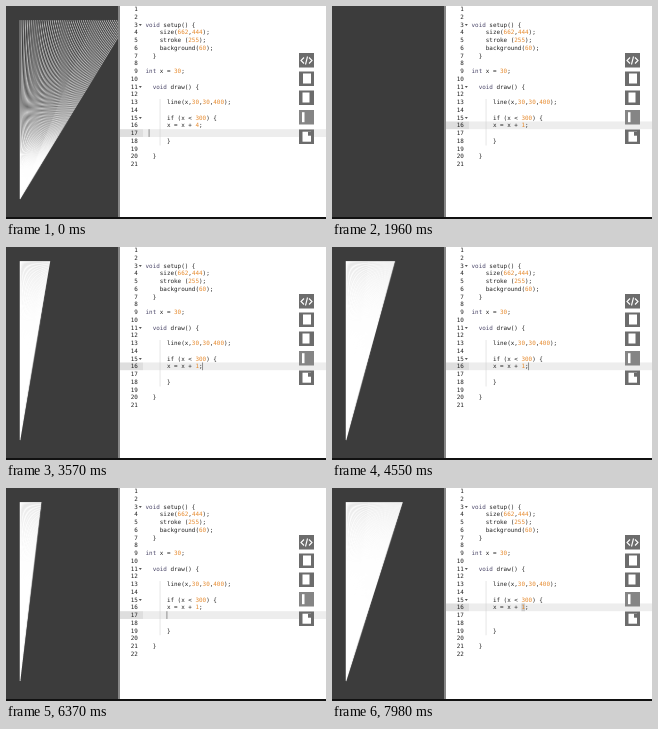
Write an HTML page with a canvas that moves like this. It is 320 px wide and 213 px high and loops after 8000 ms.

```html
<!DOCTYPE html>
<html>
<head>
<meta charset="utf-8">
<style>
html, body { margin: 0; width: 100%; height: 100%; overflow: hidden; background: #fff; }
canvas, svg { position: absolute; left: 0; top: 0; }
text { font: 5.93px "DejaVu Sans Mono", monospace; white-space: pre; fill: #222; }
.num { fill: #e68a2e; }
.type { fill: #4a4668; }
.no { text-anchor: end; }
</style>
</head>
<body>
<canvas id="view" width="320" height="213"></canvas>
<svg width="320" height="213" viewBox="0 0 320 213">
  <rect x="114" width="206" height="213" fill="#fff"/>
  <rect x="112" width="2" height="213" fill="#868686"/>
  <g id="editor"></g>
  <g id="icons"></g>
  <rect y="211" width="320" height="2" fill="#111"/>
</svg>
<script>
const LOOP = 8000, PITCH = 7.75, CHAR = 3.57, LEFT = 139.5, GUTTER = 137;
const WIDTH = 662, HEIGHT = 444, DENSITY = 2;
const $ = id => document.getElementById(id);
const view = $('view').getContext('2d');
const sketch = document.createElement('canvas');
sketch.width = WIDTH * DENSITY;
sketch.height = HEIGHT * DENSITY;
const pen = sketch.getContext('2d');
pen.scale(DENSITY, DENSITY);

// Each run of the sketch: start time, x increment and [time, x] points
const runs = [
  { at: 0, step: 4, keys: [[0, 256], [400, 302]] },
  { at: 1960, step: 1, keys: [[2170, 30], [2590, 50], [3640, 96], [3780, 98], [4550, 131]] },
  { at: 4900, step: 1, keys: [[5090, 30], [5670, 58], [6160, 72], [6300, 72], [6930, 97], [7980, 147]] }
];

// Editor states: caret line and column, blink origin, selection, step digit, extra line
const edits = [
  { at: 0, line: 17, col: 1, blink: -220, digit: 4 },
  { at: 1120, line: 16, col: 15, blink: 1120, digit: 4 },
  { at: 1190, line: 16, col: 14, blink: 1190, digit: 4, select: true },
  { at: 1330, line: 16, col: 15, blink: 1460, digit: 1 },
  { at: 2870, line: 16, col: 16, blink: 3460, digit: 1 },
  { at: 4900, line: 17, col: 6, blink: 4900, digit: 1, extra: true },
  { at: 6650, line: 16, col: 14, blink: 6650, digit: 1, extra: true },
  { at: 7000, line: 16, col: 14, blink: 7000, digit: 1, extra: true, select: true }
];

const current = (list, t) => list.filter(s => s.at <= t).pop();

function codeLines({ digit, extra }) {
  return [
    '', '', 'void setup() {', '    size(662,444);', '    stroke (255);',
    '    background(60);', '  }', '', 'int x = 30;', '', '  void draw() {', '',
    '      line(x,30,30,400);', '', '      if (x < 300) {', `      x = x + ${digit};`,
    '', ...(extra ? [''] : []), '      }', '', '  }', ''
  ];
}

function rect(x, y, w, h, fill) {
  return `<rect x="${x}" y="${y}" width="${w}" height="${h}" fill="${fill}"/>`;
}

function highlight(line) {
  return line.replace('<', '&lt;')
    .replace(/\d+/g, '<tspan class="num">$&</tspan>')
    .replace(/void|int /, '<tspan class="type">$&</tspan>');
}

function editorMarkup(edit) {
  const lines = codeLines(edit);
  const top = (edit.line - 1) * PITCH - 0.8;
  const caretX = LEFT + edit.col * CHAR;
  let out = rect(114, top, GUTTER - 114, PITCH, '#dedede') +
    rect(GUTTER, top, 320 - GUTTER, PITCH, '#ededed');
  if (edit.select) out += rect(caretX, top, CHAR, PITCH, '#cacaca');
  // indent guide along the body of draw()
  out += rect(LEFT + 4 * CHAR, 12 * PITCH, 0.5, (lines.length - 15) * PITCH, '#ccc');
  lines.forEach((line, i) => {
    const y = 5.2 + i * PITCH;
    out += `<text class="no" x="131.8" y="${y}">${i + 1}</text>` +
      `<text x="${LEFT}" y="${y}">${highlight(line)}</text>`;
    if (line.endsWith('{')) out += `<path d="M132.8 ${y - 2.8}h3l-1.5 2z" fill="#555"/>`;
  });
  return out + `<rect id="caret" x="${caretX - 0.4}" y="${top}" width="0.8" height="${PITCH}" fill="#777"/>`;
}

function iconMarkup() {
  const box = (y, fill = '#6c6c6c') => rect(293, y, 15, 14.5, fill);
  const page = (x, y, w) => rect(x, y, w, 10, '#fff');
  return box(47) + box(65.5) + box(84.5) + box(104, '#858585') + box(123.5) +
    '<path d="M298 51.5l-3 3 3 3M303 51.5l3 3-3 3M301.5 50.5l-2 8" fill="none" stroke="#fff" stroke-width="1.1"/>' +
    page(297, 67.5, 8) + page(296.5, 86.5, 7) + page(296, 106.2, 2.5) +
    page(296.5, 125.7, 8.5) + rect(302, 125.7, 3, 4, '#6c6c6c');
}

function xAt(keys, t) {
  if (t < keys[0][0]) return 0;
  for (let i = 1; i < keys.length; i++) {
    const [t0, x0] = keys[i - 1], [t1, x1] = keys[i];
    if (t < t1) return x0 + (x1 - x0) * (t - t0) / (t1 - t0);
  }
  return keys[keys.length - 1][1];
}

function drawLine(x) {
  pen.beginPath();
  pen.moveTo(x, 30);
  pen.lineTo(30, 400);
  pen.stroke();
}

function drawSketch(t) {
  const { step, keys } = current(runs, t);
  const last = xAt(keys, t);
  pen.fillStyle = 'rgb(60,60,60)';
  pen.fillRect(0, 0, WIDTH, HEIGHT);
  pen.strokeStyle = '#fff';
  for (let x = 30; x <= last; x += step) drawLine(x);
  // once x stops growing, the same line keeps being painted over itself
  if (last > 300) for (let i = 0; i < 12; i++) drawLine(last);
  view.fillStyle = 'rgb(60,60,60)';
  view.fillRect(0, 0, 320, 213);
  view.imageSmoothingQuality = 'high';
  view.drawImage(sketch, -0.5, -0.3, 320, 320 * HEIGHT / WIDTH);
}

let shown;
function frame(now) {
  const t = now % LOOP;
  drawSketch(t);
  const edit = current(edits, t);
  if (edit !== shown) {
    $('editor').innerHTML = editorMarkup(edit);
    shown = edit;
  }
  const on = !edit.select && (t - edit.blink) % 1000 < 500;
  $('caret').setAttribute('opacity', on ? 1 : 0);
  requestAnimationFrame(frame);
}

$('icons').innerHTML = iconMarkup();
frame(0);
</script>
</body>
</html>
```
